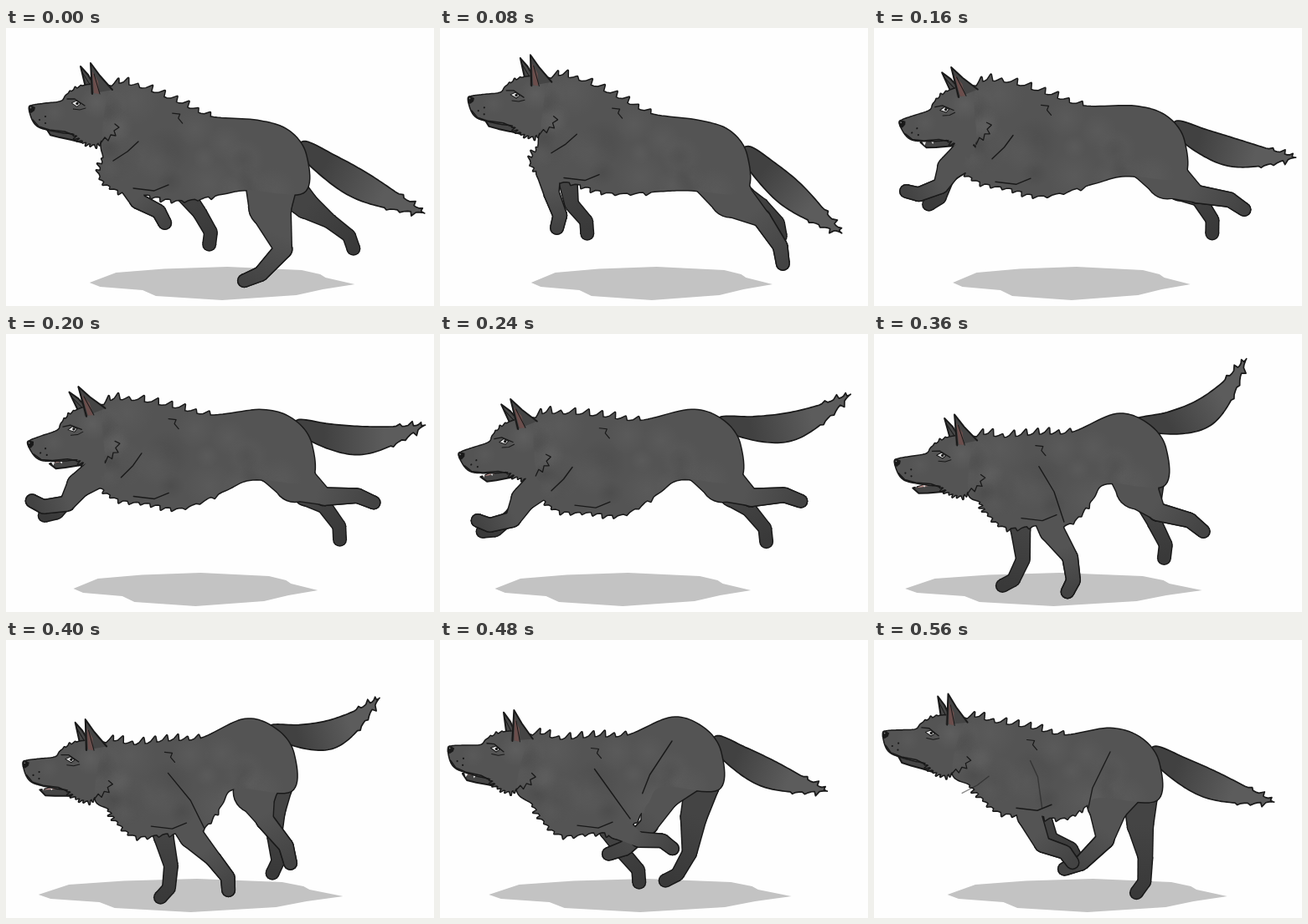
These frames come from a looping animation (511 by 333 pixels, 0.6 s). An HTML page with a canvas:

```html
<!DOCTYPE html>
<html lang="en">
<head>
<meta charset="utf-8">
<title>Running wolf</title>
<style>
html, body { margin: 0; width: 100%; height: 100%; overflow: hidden; background: #fefefe; }
canvas { display: block; width: 511px; height: 333px; }
</style>
</head>
<body>
<canvas id="stage" width="511" height="333"></canvas>
<script>
const ctx = document.getElementById('stage').getContext('2d');
const LOOP = 600, STEP = 40, RAD = Math.PI / 180;
const INK = '#191919', COAT = '#545454', DARK = '#434343', FAR = '#393939';

// Key points of the gait; all other shapes hang on these by rule.
// Legs hold the wrist or hock and the angle of the bone below it.
const TIMES = [0, 80, 160, 240, 360, 480, 560];
const KEYS = {
  nose: [[28, 97], [34, 86], [31, 115], [23, 146], [25, 154], [10, 131], [11, 113]],
  tilt: [[0], [1], [-11], [-11], [-2], [6], [5]],
  chest: [[113, 178], [109, 162], [106, 168], [122, 195], [137, 215], [125, 217], [131, 190]],
  hip: [[318, 165], [326, 165], [330, 148], [318, 145], [308, 150], [295, 147], [300, 160]],
  tail: [[495, 220], [476, 243], [499, 155], [486, 75], [442, 34], [458, 180], [473, 193]],
  foreNear: [[157, 207, 39], [133, 198, 81], [80, 189, 171], [87, 222, 178], [234, 267, 94], [237, 239, 15], [201, 245, 31]],
  foreFar: [[231, 221, 73], [157, 211, 62], [88, 178, 124], [86, 217, 151], [178, 270, 128], [219, 255, 62], [211, 238, 39]],
  hindNear: [[331, 265, 141], [384, 228, 65], [385, 199, 18], [371, 196, 4], [338, 213, 23], [250, 221, 144], [276, 239, 144]],
  hindFar: [[386, 231, 49], [383, 212, 58], [388, 205, 69], [369, 210, 62], [335, 226, 75], [298, 255, 131], [324, 260, 104]]
};

const SKULL = [0,-1, 4,-4, 17,-6, 38,-9, 45,-17, 63,-27, 80,-29, 100,-26, 114,-14, 117,8,
  101,33, 90,35, 78,42, 64,38, 54,30, 40,28, 24,25, 11,21, 4,13];
const JAW = [20,23, 25,31, 36,34, 50,37, 62,40, 66,26, 42,24];
const SHADE = [0,305, .1,293, .28,288.5, .52,286, .8,290, .87,295, .89,299, 1,307,
  .88,313, .78,320, .5,326, .25,321, .2,314, .04,310];

const add = (p, x, y) => [p[0] + x, p[1] + y];
const mix = (p, q, u) => p.map((v, i) => v + (q[i] - v) * u);
const polar = (p, deg, r) => add(p, r * Math.cos(deg * RAD), r * Math.sin(deg * RAD));
const clamp = v => Math.max(0, Math.min(1, v));
const wave = (t, peak) => Math.cos((t - peak) / LOOP * 2 * Math.PI);
const noise = i => Math.abs(Math.sin(i * 127.1 + 3.7) * 4375.85) % 1;
const pairs = a => a.reduce((out, v, i) => (i % 2 || out.push([v, a[i + 1]]), out), []);

// The point at u between p and q, pushed sideways by d.
function bow(p, q, u, d) {
  const dx = q[0] - p[0], dy = q[1] - p[1], len = Math.hypot(dx, dy) || 1;
  return add(mix(p, q, u), dy / len * d, -dx / len * d);
}

// Smooth periodic interpolation through the key points.
function at(rows, t) {
  const n = TIMES.length;
  const time = i => TIMES[(i + n) % n] + Math.floor(i / n) * LOOP;
  const row = i => rows[(i + n) % n];
  let i = n - 1;
  while (TIMES[i] > t) i--;
  const h = time(i + 1) - time(i), u = (t - time(i)) / h;
  return row(i).map((p, k) => {
    const q = row(i + 1)[k];
    const m = (q - row(i - 1)[k]) / (time(i + 1) - time(i - 1)) * h;
    const w = (row(i + 2)[k] - p) / (time(i + 2) - time(i)) * h;
    return p + u * m + u * u * (3 * (q - p) - 2 * m - w) + u * u * u * (2 * (p - q) + m + w);
  });
}

// Closed smooth outline; fur(i) is the tuft height on segment i.
function outline(pts, fur = () => 0) {
  const n = pts.length, path = new Path2D();
  for (let i = 0; i < n; i++) {
    const [a, b, c, d] = [-1, 0, 1, 2].map(o => pts[(i + o + n) % n]);
    const len = Math.hypot(c[0] - b[0], c[1] - b[1]) || 1;
    const tx = (c[0] - b[0]) / len, ty = (c[1] - b[1]) / len;
    for (let k = 0; k < 12; k++) {
      const u = k / 12;
      const [x, y] = [0, 1].map(j => b[j] + .5 * u * (c[j] - a[j]
        + u * (2 * a[j] - 5 * b[j] + 4 * c[j] - d[j] + u * (3 * (b[j] - c[j]) + d[j] - a[j]))));
      const tuft = fur(i) * [0, 0, .2, 1][k % 4] * (.4 + .7 * noise(i * 12 + k));
      path.lineTo(x + (ty + tx * .4) * tuft, y + (ty * .4 - tx) * tuft);
    }
  }
  path.closePath();
  return path;
}

function trace(pts) {
  ctx.beginPath();
  pts.forEach(p => ctx.lineTo(...p));
}

function poly(list, color, ink) {
  trace(pairs(list));
  ctx.closePath();
  ctx.fillStyle = color;
  ctx.fill();
  if (ink) { ctx.strokeStyle = INK; ctx.lineWidth = ink; ctx.stroke(); }
}

function line(pts, width = 1.4, alpha = 1) {
  trace(pts);
  ctx.globalAlpha = alpha;
  ctx.strokeStyle = INK;
  ctx.lineWidth = width;
  ctx.stroke();
  ctx.globalAlpha = 1;
}

function dot(x, y, r, color) {
  ctx.beginPath();
  ctx.arc(x, y, r, 0, 7);
  ctx.fillStyle = color;
  ctx.fill();
}

function fade(a, b, from, to) {
  const g = ctx.createLinearGradient(...a, ...b);
  g.addColorStop(.3, from);
  g.addColorStop(1, to);
  return g;
}

function glow([x, y], r, tone, alpha = .25) {
  const g = ctx.createRadialGradient(x, y, 0, x, y, r);
  g.addColorStop(0, `rgba(${tone},${tone},${tone},${alpha})`);
  g.addColorStop(1, `rgba(${tone},${tone},${tone},0)`);
  dot(x, y, r, g);
}

// Chain of tapered segments.
function limb({ pts, radii }, color, grow = 0, from = 0) {
  for (let i = from; i < pts.length; i++) {
    const p = pts[i], q = pts[i + 1], r = radii[i] + grow;
    dot(...p, r, color);
    if (!q) break;
    const R = radii[i + 1] + grow;
    poly([bow(p, q, 0, r), bow(p, q, 1, R), bow(p, q, 1, -R), bow(p, q, 0, -r)].flat(), color);
  }
}

// Root, knee, wrist or hock, ankle and toe.
function leg(root, [x, y, angle], length, bend, radii) {
  const mid = [x, y], toe = polar(mid, angle, length);
  return { radii, pts: [root, bow(root, mid, .48, bend), mid, bow(mid, toe, .66, 6), toe] };
}

function drawTail(hip, tip) {
  const lift = Math.atan2(tip[1] - hip[1], tip[0] - hip[0]) / RAD;
  const root = polar(hip, .8 * lift - 46, 42);
  const side = s => [0, .25, .5, .75, 1].map(u => {
    const swell = Math.sin(Math.PI * u);
    return bow(root, tip, u, s * (7 * (1 - u) + 12.5 * swell + 1) - (13 - .35 * lift) * swell);
  });
  const path = outline([...side(1), ...side(-1).reverse()], i => i === 3 || i === 5 ? 5 : 0);
  ctx.fillStyle = fade(root, mix(root, tip, .7), '#414141', '#5c5c5c');
  ctx.fill(path);
  ctx.strokeStyle = INK;
  ctx.lineWidth = 1.7;
  ctx.stroke(path);
}

function drawJaw(open) {
  poly([67,-26, 61,-51, 70,-41, 78,-27], '#474747', 2);
  line([[63,-44], [73,-28]], 1);
  ctx.save();
  ctx.translate(52, 26);
  ctx.rotate(-open);
  ctx.translate(-52, -26);
  poly(JAW, '#454545', 2);
  if (open > .08) poly([24,24, 30,25, 46,27, 44,22], '#b98f8c');
  ctx.restore();
  if (open > .08) [21, 31].forEach(x => poly([x,24, x + 6,26, x + 3,31], '#eee'));
}

function drawFace() {
  glow([80, -8], 20, 125);
  glow([30, 4], 14, 105);
  poly([73,-18, 73,-55, 84,-40, 99,-23], '#454545');
  poly([77,-19, 75,-45, 82,-33, 83,-18], '#6b4e4c');
  line([[75,-18], [73,-55], [84,-40], [99,-23]], 2);
  line([[77,-42], [84,-18]], 1);
  poly([50,-7, 56,-10, 61,-6, 57,-3], '#e4e4e4', 1);
  dot(57, -6.5, 1.7, INK);
  line([[45,-12], [54,-12], [66,-4]], 1.3);
  line([[52,0], [60,1], [67,-1]], 1);
  poly([-1,-2, 3,-4, 7,-2, 6,2, 2,5, -1,3], INK);
  dot(1.5, -1.5, .8, '#888');
  [[12,13], [19,9], [19,17]].forEach(([x, y]) => dot(x, y, 1.1, INK));
  line([[4,13], [11,21], [24,25], [42,27], [52,31]], 1.6);
  line([[85,41], [90,34], [94,38], [97,31], [103,32], [101,26], [107,22], [102,18]], 1.3);
}

function draw(t) {
  const k = Object.fromEntries(Object.entries(KEYS).map(([name, rows]) => [name, at(rows, t)]));
  const { nose, chest, hip } = k;
  const tilt = k.tilt[0] * RAD;
  const onHead = (x, y) => add(nose, x * Math.cos(tilt) - y * Math.sin(tilt), x * Math.sin(tilt) + y * Math.cos(tilt));
  const inHead = paint => {
    ctx.save();
    ctx.translate(...nose);
    ctx.rotate(tilt);
    paint();
    ctx.restore();
  };

  // Torso: rigid rump and withers, joined by a sagging back and a belly.
  const withers = onHead(131, -25), rump = add(hip, -18, -54);
  const saddle = add(mix(withers, rump, .31), 0, 5);
  const back = [onHead(97, -25), withers, saddle, add(mix(withers, rump, .6), 0, 11),
    rump, add(hip, 19, -42), add(hip, 40, -13), add(hip, 37, 32)];
  const crotch = add(hip, -30, 29), low = [chest[0] + 97, chest[1] * .55 + 108];
  const brisket = add(chest, 21, 16), throat = onHead(86, 37);
  const under = [crotch, mix(low, crotch, .6), low, mix(brisket, low, .5), brisket,
    chest, add(mix(chest, throat, .5), 3, 0), throat];

  const shoulder = wrist => [chest[0] + 29 + .5 * (wrist[0] - chest[0] - 29), chest[1] - 14];
  const foreNear = leg(shoulder(k.foreNear), k.foreNear, 42, -5, [17, 14, 8.5, 7.5, 7]);
  const foreFar = leg(shoulder(k.foreFar), k.foreFar, 40, 0, [13, 11, 7.5, 7, 7]);
  const hindNear = leg(hip, k.hindNear, 60, -9, [35, 25, 10, 8, 7]);
  const hindFar = leg(add(hip, 18, 26), k.hindFar, 44, -3, [20, 15, 8, 7, 7]);

  ctx.fillStyle = '#fefefe';
  ctx.fillRect(0, 0, 511, 333);
  ctx.lineJoin = ctx.lineCap = 'round';
  const left = 73 + 36 * wave(t, 70), right = 397 + 26 * wave(t, 530);
  poly(SHADE.map((v, i) => i % 2 ? v : left + v * (right - left)), '#c3c3c3');

  drawTail(hip, k.tail);
  [hindFar, foreFar].forEach(l => {
    limb(l, INK, 1.5);
    limb(l, fade(l.pts[0], l.pts[4], '#444', FAR));
  });
  inHead(() => drawJaw(.13 + .13 * wave(t, 330)));

  // Ink first, then coat, so joined parts share one contour.
  const torso = outline([...back, ...under], i => i < 3 ? 9 : i > 8 && i < 14 ? 5 : 0);
  const head = outline(pairs(SKULL), i => i > 10 && i < 14 ? 5 : i === 4 ? 3 : 0);
  ctx.strokeStyle = INK;
  ctx.lineWidth = 3;
  ctx.stroke(torso);
  inHead(() => ctx.stroke(head));
  limb(hindNear, INK, 1.5);
  limb(foreNear, INK, 1.5);
  ctx.fillStyle = COAT;
  ctx.fill(torso);
  inHead(() => ctx.fill(head));
  [hindNear, foreNear].forEach(l => {
    limb(l, INK, 1.5, 2);
    limb(l, fade(l.pts[1], l.pts[4], COAT, DARK));
  });

  // Cloudy coat.
  ctx.save();
  ctx.clip(torso);
  for (let i = 0; i < 26; i++) {
    const column = i % 8;
    const spot = mix(back[column], under[7 - column], .1 + .8 * noise(i));
    glow(spot, 14 + 18 * noise(i + 50), i % 3 ? 108 : 58);
  }
  ctx.restore();

  // Creases show while a near leg is swung under the body.
  const tucked = clamp((k.foreNear[0] - chest[0] - 50) / 40);
  const [root, elbow] = foreNear.pts, knee = hindNear.pts[1];
  line([onHead(130, 39), onHead(117, 51), onHead(100, 62)], 1.4, 1 - tucked);
  line([add(saddle, 0, 38), add(root, 15, -12), add(elbow, 15, -10)], 1.4, tucked);
  line([add(hip, -18, -26), add(mix(hip, knee, .6), -27, -4), add(knee, -24, 6)], 1.4, clamp((hip[0] - k.hindNear[0]) / 25));
  line([[-20,-8], [5,-5], [22,-12]].map(p => add(under[3], ...p)));
  line([[-4,13], [5,14], [3,19], [8,25]].map(p => add(saddle, ...p)), 1.2);
  inHead(drawFace);
}

function tick(now) {
  draw(Math.floor(now % LOOP / STEP) * STEP);
  requestAnimationFrame(tick);
}
draw(0);
requestAnimationFrame(tick);
</script>
</body>
</html>
```
